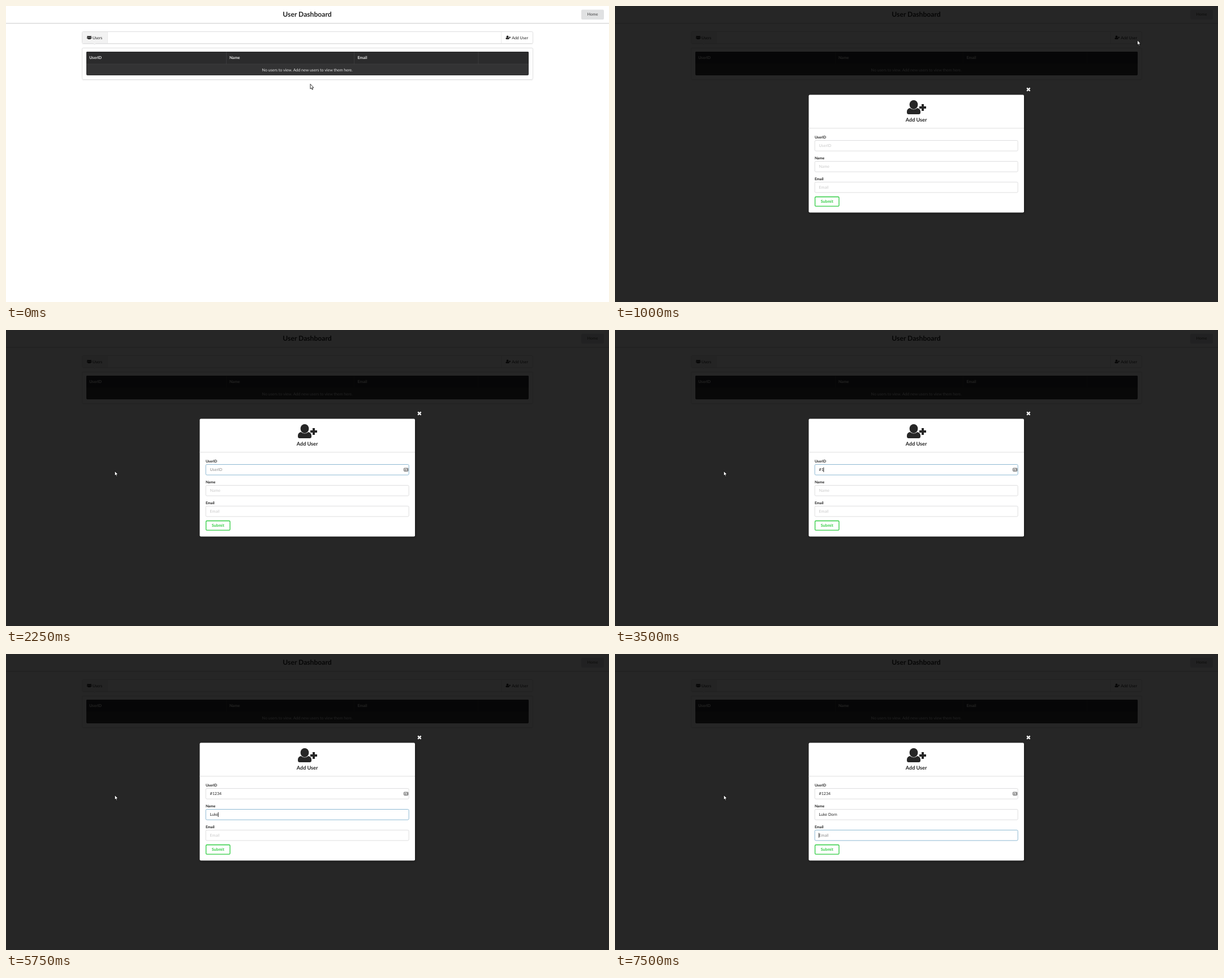
These frames come from a looping animation (1066x525 px, 8 s). An HTML page:

```html
<!DOCTYPE html>
<html lang="en">
<head>
<meta charset="utf-8">
<title>User Dashboard</title>
<style>
  html, body { margin: 0; width: 100%; height: 100%; overflow: hidden; background: #fff; }
  svg { display: block; }
  text { font: 7.07px Lato, sans-serif; fill: #212121; white-space: pre; text-rendering: geometricPrecision; }
  .b { font-weight: 700; }
  .mid { text-anchor: middle; }
  .light { fill: #e8e8e8; }
  .line { fill: none; stroke: #dededf; }
  .box { fill: #fff; stroke: #dededf; }
</style>
</head>
<body>
<svg width="1066" height="525" viewBox="0 0 1066 525">
  <defs>
    <g id="userPlus">
      <ellipse cx="12" cy="8" rx="7.4" ry="8"/>
      <path d="M0 20C0 17 2 14.8 5.5 14Q12 19 18.5 14C22 14.8 24 17 24 20V22Q24 25 21 25H3Q0 25 0 22Z"/>
      <path d="M26 7h4v4h4v4h-4v4h-4v-4h-4v-4h4z"/>
    </g>
    <g id="users">
      <circle cx="1.7" cy="1.7" r="1.2"/><circle cx="6.9" cy="1.7" r="1.2"/>
      <path d="M0 3.6Q1.7 2.4 2.8 3.4L2.2 5H0ZM8.6 3.6Q6.9 2.4 5.8 3.4L6.4 5H8.6Z"/>
      <circle cx="4.3" cy="2.1" r="1.7"/>
      <path d="M1.7 6.6V5.4Q1.8 3.9 3 3.6Q4.3 4.6 5.6 3.6Q6.8 3.9 6.9 5.4V6.6Z"/>
    </g>
    <filter id="shade" x="-10%" y="-10%" width="120%" height="125%">
      <feDropShadow dx="1" dy="2" stdDeviation="2" flood-opacity=".3"/>
    </filter>
  </defs>

  <rect width="1066" height="525" fill="#fff"/>
  <path d="M0 30.5H1066" class="line" style="stroke:#d6d6d7"/>
  <path d="M0 31.5H1066" class="line" style="stroke:#f1f1f1"/>
  <text x="532.5" y="19.3" class="b mid" style="font-size:12.12px">User Dashboard</text>
  <rect x="1017" y="6.5" width="40" height="17.5" rx="2" fill="#e0e1e2"/>
  <text x="1037" y="17.2" class="b mid" style="fill:#666667">Home</text>

  <path d="M135 67.4H931" class="line" style="stroke:#efefef"/>
  <rect x="134.5" y="45.5" width="797" height="21" rx="2" class="box"/>
  <path d="M179 46H136.5Q135 46 135 47.5V64.5Q135 66 136.5 66H179Z" fill="#f2f2f2"/>
  <path id="hover" d="M876 46H929.5Q931 46 931 47.5V64.5Q931 66 929.5 66H876Z" fill="#f7f7f7"/>
  <path d="M179.5 46V66M875.5 46V66" class="line" style="stroke:#ebebeb"/>
  <path d="M154 66L156.5 68.7L159 66" fill="#f2f2f2" stroke="#dcdcdd" stroke-width=".6"/>
  <use href="#users" x="142.9" y="52.5" fill="#212121"/>
  <text x="153" y="58.5">Users</text>
  <use href="#userPlus" transform="translate(883.5 52.5) scale(.255)" fill="#212121"/>
  <text x="894.2" y="58.5">Add User</text>

  <path d="M135 131.4H931" class="line" style="stroke:#efefef"/>
  <rect x="134.5" y="74.5" width="797" height="55.8" rx="2" class="box"/>
  <rect x="142" y="81" width="782" height="42" rx="2" fill="#333334"/>
  <path d="M142 103V83Q142 81 144 81H922Q924 81 924 83V103Z" fill="#2b2b2c"/>
  <path d="M389.5 81V103M615.5 81V103M835 81V103M142 103H924" stroke="#3f3f40" stroke-width=".8"/>
  <text x="147.2" y="94.3" class="b light">UserID</text>
  <text x="395" y="94.3" class="b light">Name</text>
  <text x="621.4" y="94.3" class="b light">Email</text>
  <text x="532.7" y="115.5" class="mid light">No users to view. Add new users to view them here.</text>

  <g id="modal">
    <rect width="1066" height="525" fill="#000" opacity=".85"/>
    <path d="M728.2 145.4L733.6 150.8M733.6 145.4L728.2 150.8" stroke="#fff" stroke-width="2.2"/>
    <rect x="342.5" y="157.5" width="380.5" height="208.7" rx="2" fill="#fff" filter="url(#shade)"/>
    <use href="#userPlus" x="516" y="167" fill="#262626"/>
    <text x="532.6" y="205.4" class="b mid" style="font-size:9.09px">Add User</text>
    <path d="M342.5 216.8H723" class="line"/>
    <g id="fields"></g>
    <g id="card" fill="none" stroke="#444" stroke-width=".9">
      <rect x="703.6" y="245.2" width="7.2" height="5.2" rx=".6"/>
      <path d="M705 247.4H707M704.8 248.9H707.2M708 247H710M708 248.6H710"/>
    </g>
    <rect x="353.6" y="338.5" width="42.4" height="16.6" rx="1.6" fill="#fff" stroke="#2ecc40" stroke-width="1.3"/>
    <text x="374.7" y="348.7" class="b mid" style="fill:#2ecc40">Submit</text>
  </g>
  <rect id="caret" width=".9" height="8.4" fill="#111"/>

  <g id="cursor">
    <path id="arrow" d="M.4 .4V9L2.3 7.3L3.7 10.4L5 9.8L3.7 6.9H6.3Z" fill="#fff" stroke="#000" stroke-width=".8"/>
    <path id="hand" d="M3 8V1.4Q3 .5 3.8 .5T4.6 1.4V5Q5.4 4.4 6 5.2Q6.9 4.7 7.4 5.6Q8.8 5.2 8.9 6.6V9Q8.9 10.5 8 11.4V13H3.8V11.8L.8 8.3Q.4 7.4 1.2 7Q2 6.8 3 8Z" fill="#fff" stroke="#000" stroke-width=".9"/>
    <path id="beam" d="M0 .5H1.6L2 .9L2.4 .5H4M2 .9V10.1M0 10.5H1.6L2 10.1L2.4 10.5H4" fill="none" stroke="#222" stroke-width=".8"/>
  </g>
</svg>
<script>
const LOOP = 8000, TEXT_X = 360.6;
const $ = id => document.getElementById(id);
const show = (el, on) => el.setAttribute('display', on ? 'inline' : 'none');

// Latest step whose start time has been reached.
const at = (steps, t) => steps.filter(s => s[0] <= t).pop();

const pointer = [
  [0, 'arrow', 537.6, 138], [250, 'arrow', 663, 106], [500, 'arrow', 875, 46],
  [750, 'hand', 923, 60], [1000, 'arrow', 923, 60.2], [1250, 'arrow', 642, 129.6],
  [1500, 'beam', 430, 242], [1750, 'beam', 400, 247],
  [2000, 'arrow', 210, 250], [2250, 'arrow', 191.8, 249.6]
];
const carets = [[0, 0], [1750, 1], [2250, 0], [3000, 1]];

const fields = [
  { label: 'UserID', y: 238, from: 1750, ring: 2000, to: 4500,
    typed: [[0, ''], [3250, '#'], [3500, '#1'], [3750, '#123'], [4000, '#1234']] },
  { label: 'Name', y: 275, from: 4500, ring: 4500, to: 7500,
    typed: [[0, ''], [5000, 'L'], [5250, 'Lu'], [5500, 'Luk'], [5750, 'Luke'], [6250, 'Luke '],
            [6750, 'Luke D'], [7000, 'Luke Dor'], [7250, 'Luke Dorn']] },
  { label: 'Email', y: 311.8, from: 7500, ring: 7500, to: LOOP, typed: [[0, '']] }
];

for (const f of fields) {
  const g = document.createElementNS('http://www.w3.org/2000/svg', 'g');
  g.innerHTML = `<text x="352.9" y="${f.y - 3.1}" class="b" style="font-size:6.56px">${f.label}</text>
    <rect x="353.2" y="${f.y + .5}" width="359" height="18.6" rx="2" class="box"/>
    <text x="${TEXT_X}" y="${f.y + 12.3}"></text>`;
  $('fields').append(g);
  f.box = g.querySelector('rect');
  f.text = g.lastElementChild;
}

function draw() {
  const t = performance.now() % LOOP;
  const [, kind, x, y] = at(pointer, t);
  for (const id of ['arrow', 'hand', 'beam']) show($(id), id === kind);
  $('cursor').setAttribute('transform', `translate(${x} ${y})`);
  show($('hover'), kind === 'hand');
  show($('modal'), t >= 1000);
  show($('card'), t >= 1750);
  show($('caret'), at(carets, t)[1]);

  for (const f of fields) {
    const value = at(f.typed, t)[1];
    const focused = t >= f.from && t < f.to;
    f.text.textContent = value || f.label;
    f.text.style.fill = value ? '#212121' : focused ? '#878787' : '#c8c8c8';
    f.box.style.stroke = focused && t >= f.ring ? '#8db9d3' : '#dededf';
    if (focused) {
      $('caret').setAttribute('x', TEXT_X - .4 + (value ? f.text.getComputedTextLength() : 0));
      $('caret').setAttribute('y', f.y + 5.6);
    }
  }
  requestAnimationFrame(draw);
}
draw();
</script>
</body>
</html>
```
